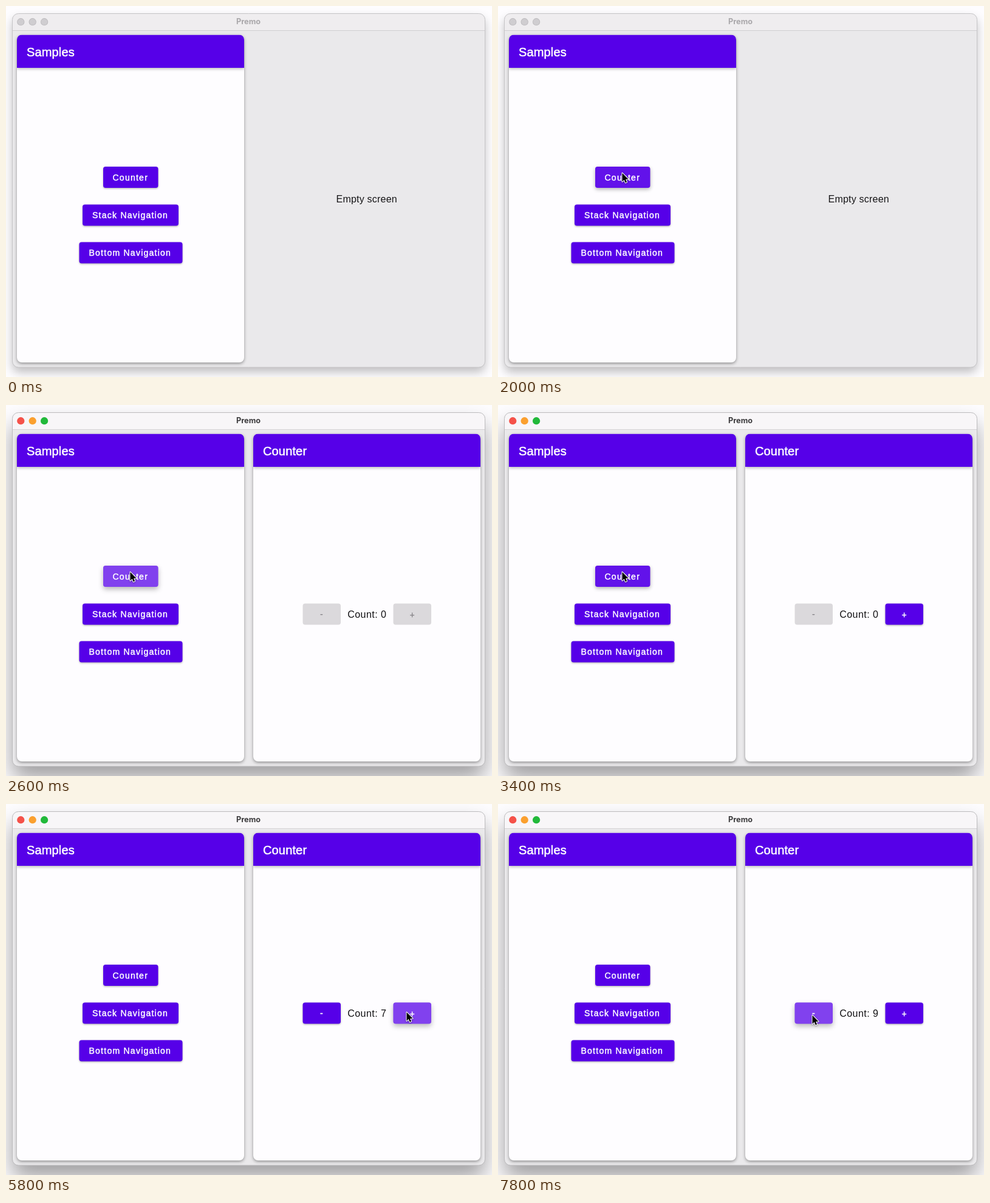
Animation, 800 px wide and 612 px high, one loop 8 s. Source, as an HTML page with a canvas:

```html
<!DOCTYPE html>
<html lang="en">
<head>
<meta charset="utf-8">
<title>Premo samples</title>
<style>
html, body { margin: 0; width: 100%; height: 100%; overflow: hidden; background: #fefdff; }
canvas { display: block; }
</style>
</head>
<body>
<canvas id="stage" width="800" height="612"></canvas>
<script>
const ctx = document.getElementById('stage').getContext('2d');
const LOOP = 8000, STEP = 200;
const SANS = '"Liberation Sans", Arial, sans-serif';
const PURPLE = '#5600e8', PAPER = '#fefdff', GREY = '#eae9eb';

const BUTTONS = {
  counter: { x: 160, y: 265, w: 90.5, label: 'Counter', tx: 175.5 },
  stack: { x: 126, y: 327.5, w: 158, label: 'Stack Navigation', tx: 142 },
  bottom: { x: 120.5, y: 389.5, w: 170, label: 'Bottom Navigation', tx: 136.5 },
  minus: { x: 488.5, y: 327.5, w: 62.5, label: '-', tx: 517, dy: -.5 },
  plus: { x: 637.5, y: 327.5, w: 62.5, label: '+', tx: 664.6, dy: .5 }
};
const BUTTON_H = 35;

// Pointer stops: time, x, y
const PATH = [
  [600, 698, 576], [800, 560, 510], [1000, 370, 440], [1200, 276, 413],
  [1400, 268, 408], [1600, 256, 396], [1800, 216, 335], [2000, 204, 275],
  [3400, 204, 275], [3600, 310, 400], [3800, 490, 454], [4000, 648, 362],
  [4200, 659, 343], [6400, 659, 343], [6600, 625, 344], [6800, 560, 346],
  [7000, 519, 346], [7200, 517, 348]
];

// Ripples: time, button, radius, strength
const FULL = 99;
const RIPPLES = [
  [2400, 'counter', 28, .09], [2600, 'counter', FULL, .2], [2800, 'counter', FULL, .07],
  [4200, 'plus', 33, .2], [4400, 'plus', FULL, .2], [4600, 'plus', FULL, .12],
  [7600, 'minus', 33, .2], [7800, 'minus', FULL, .2]
];

function pointerAt(t) {
  if (t < PATH[0][0]) return null;
  const i = PATH.findIndex(p => p[0] > t);
  if (i < 0) return PATH.at(-1).slice(1);
  const [t0, x0, y0] = PATH[i - 1], [t1, x1, y1] = PATH[i];
  const k = (t - t0) / (t1 - t0);
  return [x0 + (x1 - x0) * k, y0 + (y1 - y0) * k];
}

function countAt(t) {
  if (t < 4400) return 0;
  if (t >= 7800) return 9;
  return t < 4800 ? 1 : Math.min(10, 2 + (t - 4800) / STEP);
}

function rippleAt(t) {
  const hit = RIPPLES.find(r => r[0] === t);
  if (hit) return hit.slice(1);
  return t >= 4800 && t < 6400 ? ['plus', FULL, .2] : [];
}

function shadow(alpha, blur, dy) {
  ctx.shadowColor = `rgba(0,0,0,${alpha})`;
  ctx.shadowBlur = blur;
  ctx.shadowOffsetY = dy;
}

function box(x, y, w, h, r, fill) {
  ctx.beginPath();
  ctx.roundRect(x, y, w, h, r);
  ctx.fillStyle = fill;
  ctx.fill();
}

function disc(x, y, r, fill) {
  ctx.beginPath();
  ctx.arc(x, y, r, 0, Math.PI * 2);
  ctx.fillStyle = fill;
  ctx.fill();
}

function text(str, x, y, font, color, spacing = 0, weight = 0) {
  ctx.font = font;
  ctx.letterSpacing = spacing + 'px';
  ctx.fillStyle = ctx.strokeStyle = color;
  ctx.fillText(str, x, y);
  if (weight) {
    ctx.lineWidth = weight;
    ctx.strokeText(str, x, y);
  }
}

function drawWindow(active) {
  ctx.fillStyle = PAPER;
  ctx.fillRect(0, 0, 800, 612);
  ctx.save();
  if (active) shadow(.38, 36, 20);
  else shadow(.25, 16, 8);
  box(10.5, 12.5, 778, 583.5, 10, GREY);
  ctx.restore();

  box(10.5, 12.5, 778, 28, [10, 10, 0, 0], active ? '#f8f6f8' : '#efedef');
  ctx.fillStyle = active ? '#d5d3d6' : '#d0ced1';
  ctx.fillRect(11, 40, 777, 1);
  ctx.beginPath();
  ctx.roundRect(10.5, 12.5, 778, 583.5, 10);
  ctx.lineWidth = 1;
  ctx.strokeStyle = active ? '#bcbbbd' : '#c5c4c6';
  ctx.stroke();

  const lights = active ? ['#f5524a', '#fba02f', '#22b93a'] : Array(3).fill('#cfcdd0');
  lights.forEach((color, i) => {
    const x = 24.3 + i * 19.4;
    disc(x, 26.2, 6.1, active ? color : '#bbb9bc');
    disc(x, 26.2, 5.3, color);
  });
  text('Premo', 379, 30.2, '700 12.7px Inter, sans-serif', active ? '#3b3a3c' : '#a9a7aa');
}

function drawCard(x, title) {
  ctx.save();
  shadow(.38, 5, 2);
  box(x, 47.5, 374, 540.5, 8, PAPER);
  ctx.restore();
  ctx.save();
  ctx.beginPath();
  ctx.roundRect(x, 47.5, 374, 540.5, 8);
  ctx.clip();
  shadow(.3, 5, 2);
  box(x, 47.5, 374, 54.5, 0, PURPLE);
  ctx.restore();
  text(title, x + 16, 82.8, '20px ' + SANS, '#fff', .15, .55);
}

function drawButton(name, pointer, ripple, enabled = true) {
  const { x, y, w, label, tx, dy = 0 } = BUTTONS[name];
  const hover = enabled && pointer && pointer[0] >= x && pointer[0] <= x + w &&
    pointer[1] >= y && pointer[1] <= y + BUTTON_H;
  const [target, radius, strength] = ripple;
  const pressed = enabled && target === name;
  ctx.save();
  if (enabled) {
    if (pressed && strength > .15) shadow(.28, 9, 4);
    else if (hover) shadow(.3, 6, 2.5);
    else shadow(.3, 3, 1.2);
  }
  box(x, y, w, BUTTON_H, 4, enabled ? PURPLE : '#dbd9dc');
  ctx.restore();
  if (hover) box(x, y, w, BUTTON_H, 4, 'rgba(255,255,255,.07)');
  if (pressed) {
    ctx.save();
    ctx.beginPath();
    ctx.roundRect(x, y, w, BUTTON_H, 4);
    ctx.clip();
    disc(pointer[0], pointer[1] + 2, radius, `rgba(255,255,255,${strength})`);
    ctx.restore();
  }
  text(label, tx, y + 22.8 + dy, '14px ' + SANS, enabled ? '#fff' : '#858387', 1.25, enabled ? .45 : .25);
}

function drawPointer([x, y]) {
  const shape = [[0, 0], [0, 14.2], [3.2, 11.2], [5.2, 16], [7.6, 15], [5.6, 10.4], [10, 10.2]];
  ctx.save();
  ctx.translate(x + .5, y + .5);
  ctx.beginPath();
  shape.forEach(p => ctx.lineTo(...p));
  ctx.closePath();
  ctx.lineWidth = 2;
  ctx.lineJoin = 'round';
  ctx.strokeStyle = '#fff';
  shadow(.35, 3, 1);
  ctx.stroke();
  shadow(0, 0, 0);
  ctx.fillStyle = '#000';
  ctx.fill();
  ctx.restore();
}

function draw(t) {
  const pointer = pointerAt(t), ripple = rippleAt(t), count = countAt(t);
  drawWindow(t >= 2400);
  drawCard(18, 'Samples');
  for (const name of ['counter', 'stack', 'bottom']) drawButton(name, pointer, ripple);
  if (t < 2600) {
    text('Empty screen', 543.5, 323.5, '16px ' + SANS, '#161517', .22);
  } else {
    drawCard(407, 'Counter');
    drawButton('minus', pointer, ripple, count > 0);
    drawButton('plus', pointer, ripple, t >= 2800 && count < 10);
    const label = 'Count: ' + count;
    text(label, count > 9 ? 557.8 : 562.2, 350.8, '16px ' + SANS, '#111012', .45);
  }
  if (pointer) drawPointer(pointer);
}

function tick() {
  const t = performance.now() % LOOP;
  draw(Math.floor(t / STEP) * STEP);
  requestAnimationFrame(tick);
}
tick();
</script>
</body>
</html>
```
